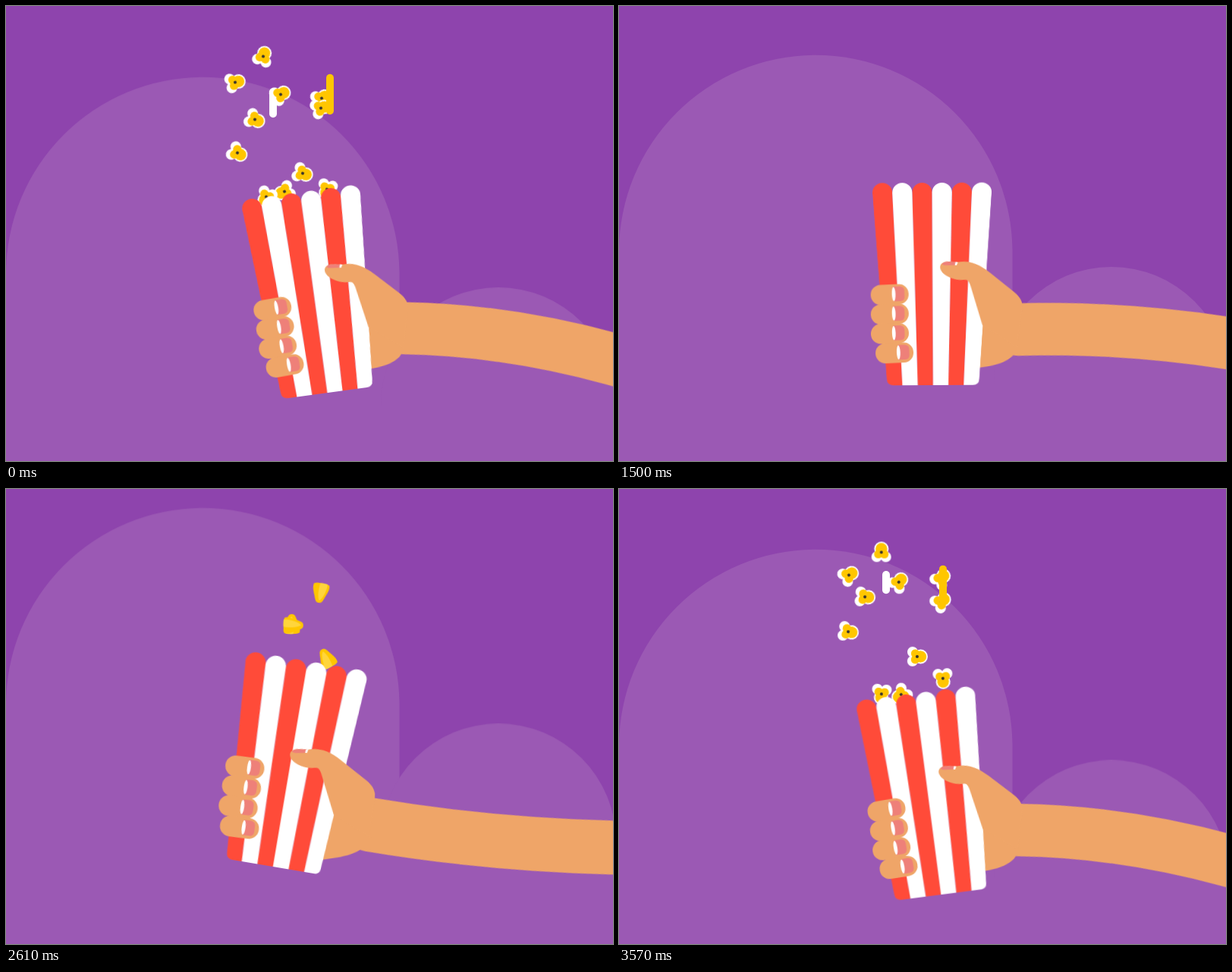
Recreate the animation shown at these times as an HTML page without scripts. Size 800 px wide and 600 px high, loop 3600 ms.

```html
<!DOCTYPE html>
<html lang="en">
<head>
<meta charset="utf-8">
<title>Popcorn toss</title>
<style>
html, body { margin: 0; width: 100%; height: 100%; overflow: hidden; background: #8e44ad; }
svg { display: block; width: 100%; height: 100%; }
.hill { fill: #9b59b4; }
.skin { fill: #efa568; }
.red { fill: #ff4b39; }
.white { fill: #fff; }
.nail { fill: #ee8079; }
.yellow { fill: #ffc600; }

.hill, .rig, .palm, .arm, .piece, .piece use, .streak { animation: 3.6s infinite linear; }
svg .far { animation-name: far; }
svg .near { animation-name: near; }
svg .rig { animation-name: rig; animation-timing-function: ease-in-out; transform-origin: 412.5px 241px; }
svg .palm { animation-name: palm; transform-origin: 478px 416px; }
svg .arm { animation-name: arm; fill: none; stroke: #efa568; stroke-width: 69; stroke-linecap: round; }
svg .piece { --p4: 392px, 270px; --h: -24px; --d: -5ms; --k: 0deg; animation-name: fly; }
.piece use { --delay: calc(var(--d) - 3600ms); }
.piece .kernel { animation-name: kernel; animation-delay: var(--delay); transform: rotate(var(--k)); }
.piece .corn { animation-name: spin, corn; animation-delay: 0s, var(--delay); }
.piece .ball { animation-name: ball; animation-delay: var(--delay); }
svg .streak { fill: none; stroke-linecap: round; stroke-width: 0; }
svg .up { animation-name: up; stroke: #ffc600; }
svg .down { animation-name: down; stroke: #fff; }

@keyframes far {
  0%, 100% { transform: translateY(29px); }
  2% { transform: translateY(36px); animation-timing-function: ease-out; }
  13.333% { transform: translateY(6px); animation-timing-function: ease-out; }
  28%, 61% { transform: translateY(0); animation-timing-function: ease-in-out; }
  71% { transform: translateY(-45px); }
  72.5% { transform: translateY(-40px); }
  75% { transform: translateY(-14px); animation-timing-function: ease-out; }
  84.167% { transform: translateY(-2px); }
  91% { transform: translateY(0); animation-timing-function: ease-in; }
  99.167% { transform: translateY(14.5px); }
}
@keyframes near {
  0%, 100% { transform: translateY(27px); }
  2% { transform: translateY(33px); animation-timing-function: ease-out; }
  13.333% { transform: translateY(5px); animation-timing-function: ease-out; }
  28%, 61% { transform: translateY(0); animation-timing-function: ease-in-out; }
  71% { transform: translateY(-39px); }
  72.5% { transform: translateY(-35px); }
  75% { transform: translateY(-10px); animation-timing-function: ease-out; }
  84.167%, 91% { transform: translateY(4px); animation-timing-function: ease-in; }
  99.167% { transform: translateY(13px); }
}
@keyframes rig {
  0%, 100% { transform: translate(-23.5px, 18px) rotate(-7.8deg) scale(1); animation-timing-function: ease-out; }
  2.2% { transform: translate(-17px, -10px) rotate(-5deg) scale(1); }
  13.333%, 31% { transform: translate(0, 0) rotate(0deg) scale(1); }
  36% { transform: translate(-28px, 32px) rotate(-9deg) scale(1); }
  41.667% { transform: translate(0, 5px) rotate(-.3deg) scale(1); }
  47% { transform: translate(-2px, -22px) rotate(5deg) scale(1); }
  53% { transform: translate(-37px, 46px) rotate(-9.5deg) scale(1); }
  57.5% { transform: translate(-12px, 11px) rotate(-3.9deg) scale(1); }
  63% { transform: translate(-20px, 50px) rotate(-9deg) scale(1); }
  69% { transform: translate(-10px, -38px) rotate(5deg) scale(1); animation-timing-function: ease-in; }
  72.5% { transform: translate(-17.2px, -2px) rotate(9.6deg) scale(1.03); animation-timing-function: linear; }
  75% { transform: translate(-17px, 90px) rotate(9deg) scale(1.1); animation-timing-function: ease-out; }
  84.167% { transform: translate(-3.5px, 246px) rotate(3.2deg) scale(1.437); }
  90% { transform: translate(-10px, 300px) rotate(-2deg) scale(1.3); animation-timing-function: linear; }
  95.833% { transform: translate(-18px, 145px) rotate(-6deg) scale(1.06); animation-timing-function: linear; }
  99.167% { transform: translate(-21px, 42px) rotate(-7.4deg) scale(1.004); animation-timing-function: linear; }
}
@keyframes palm {
  0%, 31%, 100% { transform: rotate(0deg); }
  41.667% { transform: rotate(-6deg); }
  57.5% { transform: rotate(-10.8deg); }
  72.5% { transform: rotate(-16deg); }
  99.167% { transform: rotate(-.5deg); }
}
@keyframes arm {
  0%, 36%, 99.167%, 100% { d: path("M523 424Q656.5 444.3 791 501.6L858 530"); }
  13.333%, 31% { d: path("M523 428Q661 443 800 464L870 475"); }
  41.667% { d: path("M523 427Q657.6 438 796.5 475L866 493"); }
  57.5% { d: path("M522 430Q654 471 785 514.5L851 536"); }
  72.5%, 84% { d: path("M522 434Q669 476 829 498L909 509"); }
}
@keyframes fly {
  0%, 100% { transform: translate(var(--p0)) translateY(0) scale(1); animation-timing-function: ease-out; }
  3.3% { transform: translate(var(--p0)) translateY(var(--h)) scale(1); animation-timing-function: ease-in-out; }
  13.333% { transform: translate(var(--p1)) translateY(0) scale(1); animation-timing-function: ease-in; }
  20%, 60% { transform: translate(var(--p1)) translateY(140px) scale(1); }
  67% { transform: translate(395px, 300px) translateY(0) scale(1); }
  72.5% { transform: translate(var(--p4)) translateY(0) scale(1.03); animation-timing-function: cubic-bezier(.15, .6, .4, 1); }
  84.167% { transform: translate(var(--p5)) translateY(0) scale(1.44); animation-timing-function: ease-in-out; }
  99.167% { transform: translate(var(--p6)) translateY(0) scale(1); }
}
@keyframes spin {
  0%, 100% { rotate: var(--r); }
  13.333% { rotate: calc(var(--r) + 200deg); }
  20%, 80% { rotate: calc(var(--r) - 260deg); }
  99.167% { rotate: calc(var(--r) - 20deg); }
}
@keyframes kernel {
  0%, 67%, 84.4%, 100% { opacity: 0; }
  67.01%, 84.39% { opacity: 1; }
}
@keyframes corn {
  0%, 22% { opacity: 1; scale: 1; }
  22.01% { opacity: 0; scale: 1; }
  84.16% { opacity: 0; scale: .6; }
  84.17% { opacity: 1; scale: .6; }
  85% { scale: .95; }
  86.7% { scale: 1.15; }
  88.4%, 100% { opacity: 1; scale: 1; }
}
@keyframes ball {
  0%, 80.5%, 87.5%, 100% { scale: 0; }
  81.7% { scale: .5; }
  83.6%, 84.2% { scale: 1; }
  85% { scale: .85; }
}
@keyframes up {
  0%, 100% { d: path("M427 95V139"); stroke-width: 10; }
  3% { d: path("M427 55V60"); stroke-width: 0; }
  96.5% { d: path("M427 155V160"); stroke-width: 0; }
  99.167% { d: path("M427 106V148"); stroke-width: 10; }
}
@keyframes down {
  0%, 100% { d: path("M352 113V142"); stroke-width: 10; }
  3.5% { d: path("M352 165V170"); stroke-width: 0; }
  97.5% { d: path("M352 113V114"); stroke-width: 0; }
  99.167% { d: path("M352 113V133"); stroke-width: 10; }
}
</style>
</head>
<body>
<svg viewBox="0 0 800 600">
  <defs>
    <clipPath id="tub"><path d="M331 200H494L473.6 487Q473 495 465 495H361Q352.5 495 351.6 487Z"/></clipPath>
    <g id="kernel">
      <path class="yellow" d="M0-13C4-13 5-10 7-4C10 3 11 7 10 10.5C8 13-8 13-10 10.5C-11 7-10 3-7-4C-5-10-4-13 0-13Z"/>
      <path fill="#ffd53c" d="M0-10C-4-8-8 4-7.5 12Q-2 13 2 12C3 4 3-4 0-10Z"/>
    </g>
    <g id="corn">
      <g class="white"><circle cx="-6" cy="6" r="7"/><circle cx="6" cy="6" r="7"/><circle cy="-4.5" r="9.5"/></g>
      <g class="yellow"><circle cy="-4.5" r="7.7"/><circle cx="-4" cy="2.5" r="5.5"/><circle cx="4" cy="2.5" r="5.5"/></g>
      <circle r="2" fill="#33302e"/>
    </g>
    <circle id="ball" class="yellow" r="15.5"/>
    <g id="finger">
      <rect class="skin" x="331" y="362" width="50" height="26.5" rx="13"/>
      <path class="nail" d="M361 365H370Q375.5 366 375.5 371V379Q375 384.5 370 384.5H361Z"/>
      <ellipse class="white" cx="361.3" cy="374.8" rx="2.4" ry="9.3"/>
    </g>
  </defs>

  <rect width="800" height="600" fill="#8e44ad"/>
  <path class="hill far" d="M0 324A259 259 0 0 1 518.5 324V720H0Z"/>
  <path class="hill near" d="M494 499A155 155 0 0 1 804 499V720H494Z"/>

  <path class="streak down" d="M352 113V142"/>
  <g class="piece" style="--p4:377px,179px;--p5:341px,112px;--p6:346px,84px;--p0:339px,67px;--p1:420px,133px;--r:20deg;--h:-38px;--d:-40ms">
    <use class="kernel" href="#kernel"/><use class="corn" href="#corn"/><use class="ball" href="#ball"/>
  </g>
  <g class="piece" style="--p5:263px,152px;--p6:303px,114px;--p0:302px,101px;--p1:369px,177px;--r:75deg">
    <use class="kernel" href="#kernel"/><use class="corn" href="#corn"/><use class="ball" href="#ball"/>
  </g>
  <g class="piece" style="--p5:415px,164px;--p6:369px,123px;--p0:362px,117px;--p1:452px,197px;--r:60deg">
    <use class="kernel" href="#kernel"/><use class="corn" href="#corn"/><use class="ball" href="#ball"/>
  </g>
  <g class="piece" style="--p4:414px,137px;--k:190deg;--p5:439px,114px;--p6:425px,118px;--p0:416px,122px;--p1:450px,142px;--r:60deg;--d:-50ms">
    <use class="kernel" href="#kernel"/><use class="corn" href="#corn"/><use class="ball" href="#ball"/>
  </g>
  <g class="piece" style="--p5:524px,130px;--p6:425px,149px;--p0:415px,135px;--p1:408px,150px;--r:70deg">
    <use class="kernel" href="#kernel"/><use class="corn" href="#corn"/><use class="ball" href="#ball"/>
  </g>
  <g class="piece" style="--p4:379px,180px;--k:90deg;--p5:313px,162px;--p6:324px,142px;--p0:328px,150px;--p1:390px,206px;--r:115deg;--d:40ms">
    <use class="kernel" href="#kernel"/><use class="corn" href="#corn"/><use class="ball" href="#ball"/>
  </g>
  <g class="piece" style="--p5:301px,230px;--p6:302px,188px;--p0:305px,194px;--p1:358px,226px;--r:120deg;--d:130ms">
    <use class="kernel" href="#kernel"/><use class="corn" href="#corn"/><use class="ball" href="#ball"/>
  </g>
  <g class="piece" style="--k:30deg;--p5:407px,230px;--p6:393px,221px;--p0:391px,221px;--p1:405px,222px;--r:110deg;--d:45ms">
    <use class="kernel" href="#kernel"/><use class="corn" href="#corn"/><use class="ball" href="#ball"/>
  </g>
  <g class="piece" style="--p4:422px,223px;--k:-28deg;--p5:491px,254px;--p6:427px,250px;--p0:423px,242px;--p1:432px,225px;--r:195deg;--d:130ms">
    <use class="kernel" href="#kernel"/><use class="corn" href="#corn"/><use class="ball" href="#ball"/>
  </g>
  <g class="piece" style="--k:50deg;--p5:495px,184px;--p6:372px,272px;--p0:367px,245px;--p1:461px,229px;--r:245deg;--d:40ms">
    <use class="kernel" href="#kernel"/><use class="corn" href="#corn"/><use class="ball" href="#ball"/>
  </g>
  <g class="piece" style="--k:-60deg;--p5:358px,215px;--p6:346px,271px;--p0:343px,252px;--p1:381px,229px;--r:205deg;--d:130ms">
    <use class="kernel" href="#kernel"/><use class="corn" href="#corn"/><use class="ball" href="#ball"/>
  </g>
  <path class="streak up" d="M427 95V139"/>

  <g class="rig">
    <g class="palm">
      <path class="arm" d="M523 424Q656.5 444.3 791 501.6L858 530"/>
      <path class="skin" d="M470 400L520 376C532 385 535 393 532 402V440L513 461C505 467 494 470 480 471L455 472Z"/>
    </g>
    <g clip-path="url(#tub)">
      <g class="red">
        <path d="M334 241a13.1 13.1 0 0 1 26.2 0L372.2 495H352Z"/>
        <path d="M386.4 241a13.1 13.1 0 0 1 26.2 0L412.6 495H392.4Z"/>
        <path d="M438.8 241a13.1 13.1 0 0 1 26.2 0L453 495H432.8Z"/>
      </g>
      <g class="white">
        <path d="M360.2 241a13.1 13.1 0 0 1 26.2 0L392.4 495H372.2Z"/>
        <path d="M412.6 241a13.1 13.1 0 0 1 26.2 0L432.8 495H412.6Z"/>
        <path d="M465 241a13.1 13.1 0 0 1 26.2 0L473.2 495H453Z"/>
      </g>
    </g>
    <g class="palm">
      <path class="skin" d="M431 335C431 329 437 327 443 328L455 330C472 329 484 337 495 348L524 377C532 385 535 393 532 402L520 450L478 416L468 362C466 354 464 354 458 354C446 353 431 344 431 335Z"/>
      <path class="nail" d="M434 330Q437 327 443 328L453 329.5Q453 334 449 333.5L439 332.5Q435 332 434 330Z"/>
      <path class="white" d="M452 329.400L455 330L453 334L450.5 333.5Z"/>
    </g>
    <use href="#finger" transform="rotate(-2 356 375)"/>
    <use href="#finger" transform="translate(0 25.7) rotate(-2 356 375)"/>
    <use href="#finger" transform="translate(0 51.4) rotate(-2 356 375)"/>
    <use href="#finger" transform="translate(6 77) rotate(-2 356 375)"/>
  </g>
</svg>
</body>
</html>
```
